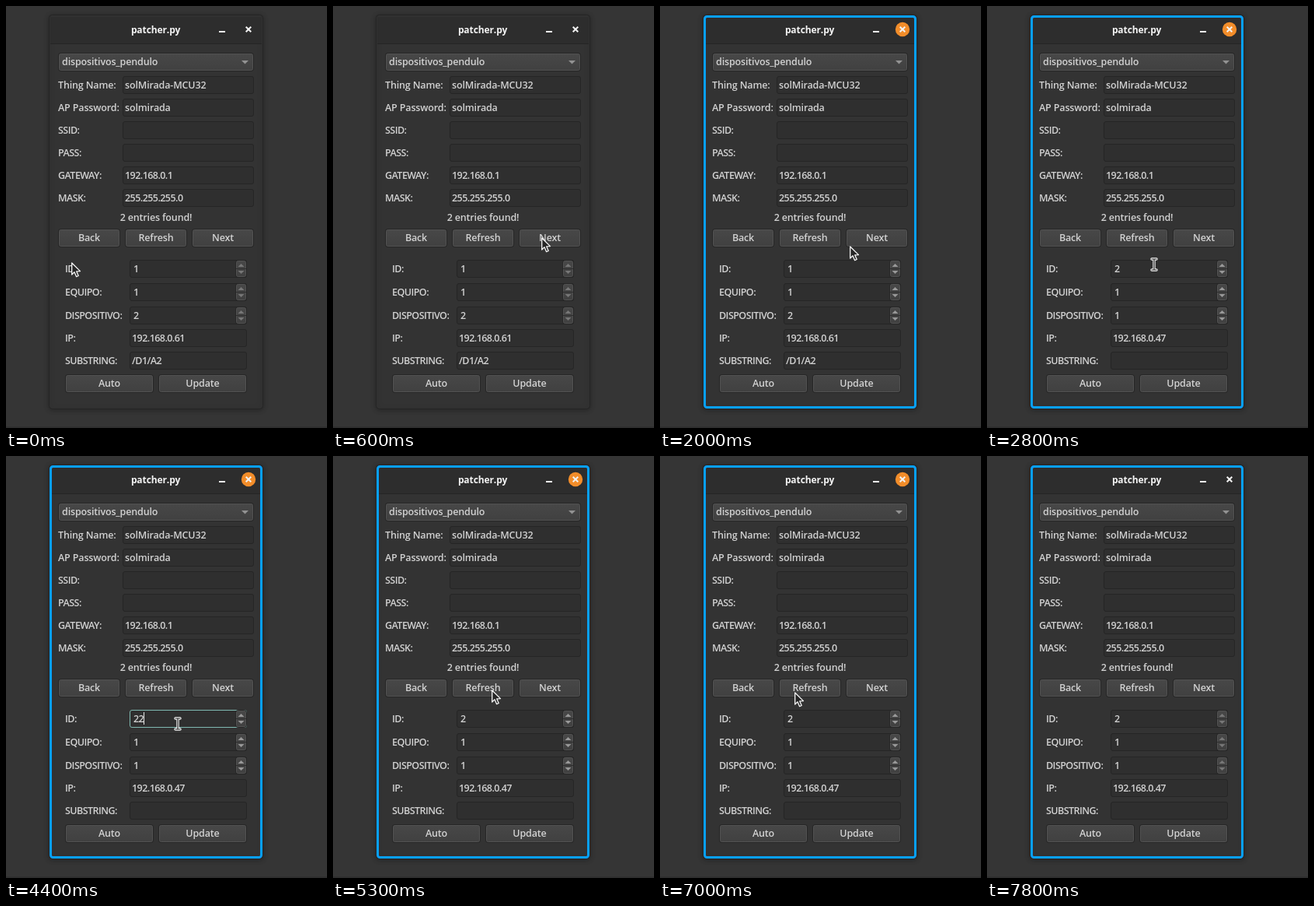
These frames come from a looping animation (413x542 px, 7.9 s). An HTML page with a canvas:

```html
<!DOCTYPE html>
<html lang="en">
<head>
<meta charset="utf-8">
<title>patcher.py</title>
<style>
html, body { margin: 0; width: 100%; height: 100%; overflow: hidden; background: #353535; }
canvas { display: block; width: 413px; height: 542px; }
</style>
</head>
<body>
<canvas id="stage" width="413" height="542"></canvas>
<script>
const ctx = document.getElementById('stage').getContext('2d');
const LOOP = 7900, STEP = 100, TRAVEL = 700;
const FAMILY = '"Open Sans", "Noto Sans", sans-serif';
const ARROW = new Path2D('M.7 1V16L4 12.8L6.6 18.7L9.2 17.5L6.7 11.8L11.5 11.6Z');
const BEAM = new Path2D('M-3 -7H3M0 -7V7M-3 7H3');

// Where the pointer arrives, and when
const STOPS = [
  { at: 0, x: 84, y: 329 },
  { at: 700, x: 269, y: 297 },
  { at: 1300, x: 128, y: 296 },
  { at: 2200, x: 247, y: 308 },
  { at: 3200, x: 208, y: 338 },
  { at: 4000, x: 208, y: 338 },
  { at: 4200, x: 286, y: 334 },
  { at: 4400, x: 221, y: 344 },
  { at: 4900, x: 204, y: 300 },
  { at: 6000, x: 169, y: 340 },
  { at: 6800, x: 233, y: 480 },
  { at: 7600, x: 72, y: 2 }
];

const UPPER = [
  ['Thing Name:', 'solMirada-MCU32'], ['AP Password:', 'solmirada'], ['SSID:', ''],
  ['PASS:', ''], ['GATEWAY:', '192.168.0.1'], ['MASK:', '255.255.255.0']
];
const LABELS = ['ID:', 'EQUIPO:', 'DISPOSITIVO:', 'IP:', 'SUBSTRING:'];
const DEVICES = [
  ['1', '1', '2', '192.168.0.61', '/D1/A2'],
  ['2', '1', '1', '192.168.0.47', '']
];

const upperY = i => 90 + 29 * i;
const lowerY = i => 326 + 29 * i + Math.min(i, 2);
const isSpin = i => i < 3;
const within = (t, a, b) => t >= a && t < b;
const easeOut = k => 1 - (1 - k) ** 3;

function pointerAt(t) {
  const next = STOPS.findIndex(s => s.at > t);
  if (next < 0) return STOPS[STOPS.length - 1];
  const a = STOPS[next - 1], b = STOPS[next];
  const from = Math.max(a.at, b.at - TRAVEL);
  const k = easeOut(Math.max(0, (t - from) / (b.at - from)));
  return { x: Math.round(a.x + (b.x - a.x) * k), y: Math.round(a.y + (b.y - a.y) * k) };
}

function box(x, y, w, h, r, fill, stroke) {
  ctx.beginPath();
  ctx.roundRect(x + 0.5, y + 0.5, w - 1, h - 1, r);
  ctx.fillStyle = fill;
  ctx.fill();
  ctx.lineWidth = 1;
  ctx.strokeStyle = stroke;
  ctx.stroke();
}

function text(str, x, y, align = 'left') {
  ctx.font = `600 12.5px ${FAMILY}`;
  ctx.letterSpacing = /[a-z]/.test(str) ? '-0.15px' : '-0.55px';
  ctx.textAlign = align;
  ctx.fillStyle = '#d2d2d2';
  ctx.fillText(str, x, y);
}

function triangle(x, y, w, h, color) {
  ctx.beginPath();
  ctx.moveTo(x - w, y);
  ctx.lineTo(x + w, y);
  ctx.lineTo(x, y + h);
  ctx.fillStyle = color;
  ctx.fill();
}

function raised(x, y, w, h) {
  const g = ctx.createLinearGradient(0, y, 0, y + h);
  g.addColorStop(0, '#484848');
  g.addColorStop(1, '#404040');
  box(x, y, w, h, 3, '#262626', '#262626');
  box(x + 1, y + 1, w - 2, h - 2, 2, g, '#525252');
}

function button(label, x, y, w) {
  raised(x, y, w, 24);
  text(label, x + w / 2, y + 15.5, 'center');
}

function field(str, x, y, w, pad, focus) {
  box(x, y, w, 23, 2.5, '#2f2f2f', focus ? '#7fb9b1' : '#252525');
  text(str, x + pad, y + 15.5);
}

function spinner(y, active) {
  const color = active ? '#999' : '#777';
  raised(295, y, 15, 23);
  ctx.fillStyle = '#2e2e2e';
  ctx.fillRect(296, y + 11, 13, 1);
  triangle(302.5, y + 9, 4, -4, color);
  triangle(302.5, y + 14, 4, 4, color);
}

function titleBar(active) {
  ctx.fillStyle = '#2d2d2d';
  ctx.fillRect(57, 14, 272, 34);
  ctx.fillStyle = '#252525';
  ctx.fillRect(57, 48, 272, 1);

  ctx.font = `700 12px ${FAMILY}`;
  ctx.letterSpacing = '-0.1px';
  ctx.textAlign = 'center';
  ctx.fillStyle = '#f4f4f4';
  ctx.fillText('patcher.py', 192.5, 35);
  ctx.fillRect(274, 32, 8, 2);

  ctx.save();
  ctx.translate(312, 30);
  if (active) {
    ctx.beginPath();
    ctx.arc(0, 0, 9.2, 0, Math.PI * 2);
    ctx.fillStyle = '#f28d2a';
    ctx.fill();
  }
  ctx.lineWidth = 2;
  ctx.strokeStyle = '#f2f2f2';
  ctx.stroke(new Path2D('M-3.3 -3.3L3.3 3.3M3.3 -3.3L-3.3 3.3'));
  ctx.restore();
}

function windowFrame(active, bordered) {
  ctx.fillStyle = '#353535';
  ctx.fillRect(0, 0, 413, 542);
  ctx.fillStyle = '#2f2f2f';
  ctx.fillRect(0, 540, 413, 2);

  ctx.save();
  ctx.shadowColor = 'rgba(0,0,0,.3)';
  ctx.shadowBlur = 7;
  ctx.shadowOffsetY = 1;
  box(55, 11, 276, 507, 4, '#333', '#252525');
  ctx.restore();
  titleBar(active);

  if (bordered) {
    ctx.beginPath();
    ctx.roundRect(57.5, 13.5, 271, 502, 3);
    ctx.lineWidth = 3;
    ctx.strokeStyle = '#08a0fa';
    ctx.stroke();
  }
}

function upperForm() {
  raised(67, 60, 252, 24);
  text('dispositivos_pendulo', 72, 76);
  triangle(307.5, 70, 4.5, 4.5, '#929292');
  UPPER.forEach(([label, value], i) => {
    text(label, 67, upperY(i) + 15.5);
    field(value, 150, upperY(i), 169, 3);
  });
  text('2 entries found!', 193, 276, 'center');
  ['Back', 'Refresh', 'Next'].forEach((label, i) => button(label, 67 + 86 * i, 286, 80));
}

function lowerForm(values, active, focus, caret) {
  LABELS.forEach((label, i) => {
    const y = lowerY(i);
    text(label, 76, y + 15.5);
    field(values[i], 159, y, 151, isSpin(i) ? 5 : 3, focus && i === 0);
    if (isSpin(i)) spinner(y, active);
  });
  if (caret) {
    ctx.fillStyle = '#e8e8e8';
    ctx.fillRect(164 + values[0].length * 6.5, 329, 1, 16);
  }
  ['Auto', 'Update'].forEach((label, i) => button(label, 76 + 120 * i, 473, 114));
}

function overField(x, y) {
  const hit = (left, right, top) => within(x, left, right) && within(y, top, top + 23);
  return UPPER.some((_, i) => hit(150, 319, upperY(i))) ||
    LABELS.some((_, i) => hit(159, isSpin(i) ? 295 : 310, lowerY(i)));
}

function outlined(path, inner, outer) {
  ctx.lineWidth = outer;
  ctx.strokeStyle = '#f6f6f6';
  ctx.stroke(path);
  ctx.lineWidth = inner;
  ctx.strokeStyle = '#222';
  ctx.stroke(path);
}

function pointer({ x, y }) {
  ctx.save();
  ctx.translate(x, y);
  ctx.lineJoin = ctx.lineCap = 'round';
  if (overField(x, y)) {
    outlined(BEAM, 1.2, 3.4);
  } else {
    ctx.fillStyle = '#262626';
    ctx.fill(ARROW);
    ctx.lineWidth = 1.3;
    ctx.strokeStyle = '#f6f6f6';
    ctx.stroke(ARROW);
  }
  ctx.restore();
}

function draw(now) {
  const t = Math.floor((now % LOOP) / STEP) * STEP;
  const first = t < 800 || within(t, 1300, 2300);
  const values = [...DEVICES[first ? 0 : 1]];
  if (within(t, 3700, 5300)) values[0] = '22';
  const active = within(t, 700, 7700);
  const focus = within(t, 3200, 5300);
  const caret = within(t, 3200, 3500) || within(t, 3700, 4600);

  windowFrame(active, t >= 700);
  upperForm();
  lowerForm(values, active, focus, caret);
  if (t < 7700) pointer(pointerAt(t));
}

const start = performance.now();
function tick() {
  draw(performance.now() - start);
  requestAnimationFrame(tick);
}
tick();
</script>
</body>
</html>
```
